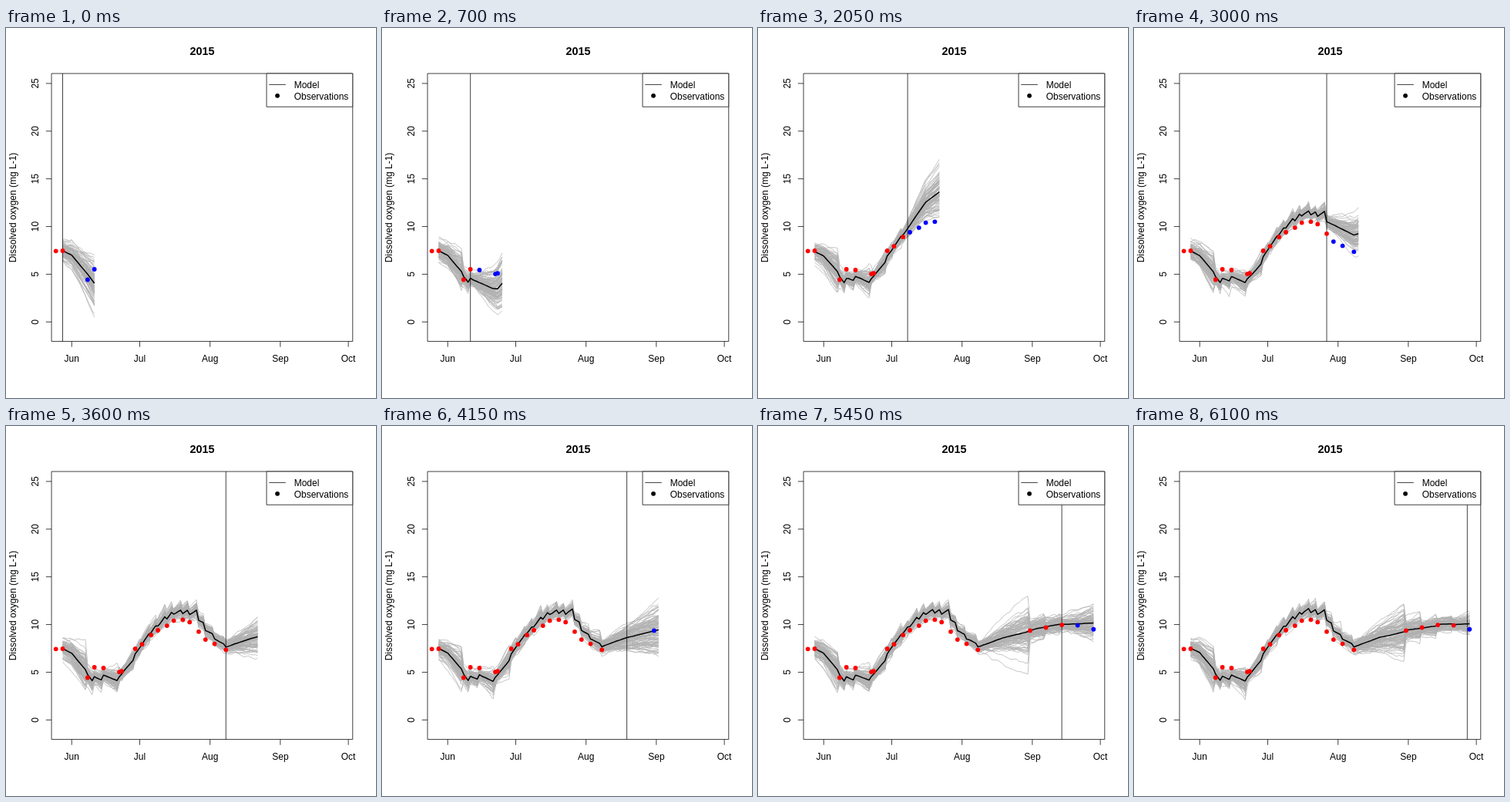
Animation, 480 px wide and 480 px high, one loop 6150 ms. Source, as an HTML page with a canvas:

```html
<!DOCTYPE html>
<html lang="en">
<head>
<meta charset="utf-8">
<title>Dissolved oxygen forecast</title>
<style>
html, body { margin: 0; width: 100%; height: 100%; overflow: hidden; background: #fff; }
canvas { display: block; }
</style>
</head>
<body>
<canvas id="stage" width="480" height="480"></canvas>
<script>
const ctx = document.getElementById('stage').getContext('2d');
const STEP = 50, DAYS = 123, HORIZON = 14, MEMBERS = 100, GAIN = 0.44;
const LEFT = 59.04, RIGHT = 449.76, TOP = 59.04, BOTTOM = 406.56;
const THIN = 0.75;
const FONT = '"Liberation Sans", Arial, sans-serif';

// Days count from 28 May; values are mg per litre.
// The axes show days 0..123 and values -1..25 with a 4% margin on each side.
const X = day => LEFT + (RIGHT - LEFT) * (day / DAYS + 0.04) / 1.08;
const Y = value => BOTTOM - (BOTTOM - TOP) * ((value + 1) / 26 + 0.04) / 1.08;

// Samples taken at a regular gap from a first day
const survey = (first, gap, values) =>
  values.map((value, i) => ({ day: Math.floor(first + i * gap), value }));

const observations = [
  survey(-3, 3, [7.43, 7.46]),
  survey(11, 3.5, [4.43, 5.52, 5.44]),
  survey(25, 1, [5.03, 5.1]),
  survey(32, 3.5, [7.46, 7.93, 8.9, 9.4, 9.88, 10.4, 10.5, 10.25, 9.25, 8.42, 7.98]),
  survey(72, 0, [7.35]),
  survey(95, 7, [9.36, 9.68, 9.96, 9.92, 9.5]),
].flat();

// Model drift per day, each rate holding until the given day
const rates = [[4, -0.12], [11, -0.28], [14, -0.32], [24, -0.1], [26, 0], [32, 0.28], [49, 0.34],
  [59, 0.17], [72, -0.12], [83, 0.086], [97, 0.06], [110, 0.04], [DAYS, 0.01]];
const drift = day => rates.find(([until]) => day <= until)[1];

function normalSource(seed) {
  const rnd = () => {
    seed = (seed + 0x6D2B79F5) | 0;
    let t = Math.imul(seed ^ (seed >>> 15), 1 | seed);
    t = (t + Math.imul(t ^ (t >>> 7), 61 | t)) ^ t;
    return ((t ^ (t >>> 14)) >>> 0) / 4294967296;
  };
  return () => Math.sqrt(-2 * Math.log(1 - rnd())) * Math.cos(2 * Math.PI * rnd());
}

const average = list => list.reduce((sum, v) => sum + v, 0) / list.length;

// Members drift apart along their own slopes; each observation pulls the mean and narrows the spread.
function simulate(today, end) {
  const normal = normalSource(1000 + today * 7919);
  const members = Array.from({ length: MEMBERS }, () =>
    ({ path: [7.45 + 0.5 * normal()], slope: normal() }));
  const mean = [average(members.map(m => m.path[0]))];
  for (let day = 1; day <= end; day++) {
    const growth = day < 56 ? 0.077 : 0.05;
    for (const { path, slope } of members) {
      path.push(path[day - 1] + drift(day) + growth * slope + 0.08 * normal());
    }
    const forecast = average(members.map(m => m.path[day]));
    const seen = day <= today && observations.find(o => o.day === day);
    const center = seen ? forecast + GAIN * (seen.value - forecast) : forecast;
    if (seen) {
      for (const m of members) {
        m.path[day] = center + 0.3 * (m.path[day] - forecast) + 0.28 * normal();
        m.slope = normal();
      }
    }
    mean.push(center);
  }
  return { members, mean };
}

function series(values, color, width) {
  ctx.strokeStyle = color;
  ctx.lineWidth = width;
  ctx.beginPath();
  values.forEach((v, day) => ctx.lineTo(X(day), Y(v)));
  ctx.stroke();
}

function line(x1, y1, x2, y2) {
  ctx.strokeStyle = '#000';
  ctx.lineWidth = THIN;
  ctx.beginPath();
  ctx.moveTo(x1, y1);
  ctx.lineTo(x2, y2);
  ctx.stroke();
}

function frame(x, y, right, bottom) {
  ctx.strokeStyle = '#000';
  ctx.lineWidth = THIN;
  ctx.strokeRect(x, y, right - x, bottom - y);
}

function dot(x, y, color) {
  ctx.fillStyle = color;
  ctx.beginPath();
  ctx.arc(x, y, 2.9, 0, 2 * Math.PI);
  ctx.fill();
}

function label(text, x, y, { align = 'center', turn = 0, font = '12px ' } = {}) {
  ctx.save();
  ctx.translate(x, y);
  ctx.rotate(turn);
  ctx.font = font + FONT;
  ctx.textAlign = align;
  ctx.fillStyle = '#000';
  ctx.fillText(text, 0, 0);
  ctx.restore();
}

function drawAxes() {
  const up = { turn: -Math.PI / 2 };
  frame(LEFT, TOP, RIGHT, BOTTOM);
  label('2015', 254.4, 35, { font: 'bold 14.4px ' });
  label('Dissolved oxygen (mg L-1)', 13, 233, up);
  ['Jun', 'Jul', 'Aug', 'Sep', 'Oct'].forEach((month, i) => {
    const x = X((Date.UTC(2015, 5 + i, 1) - Date.UTC(2015, 4, 28)) / 864e5);
    line(x, BOTTOM, x, BOTTOM + 7.2);
    label(month, x, 433);
  });
  for (let v = 0; v <= 25; v += 5) {
    line(LEFT - 7.2, Y(v), LEFT, Y(v));
    label(v, 42, Y(v), up);
  }
}

function drawLegend() {
  const x = 338.04, bottom = TOP + 43.2;
  ctx.fillStyle = '#fff';
  ctx.fillRect(x, TOP, RIGHT - x, bottom - TOP);
  frame(x, TOP, RIGHT, bottom);
  line(x + 3.24, TOP + 14.4, x + 24.84, TOP + 14.4);
  dot(x + 14.04, TOP + 28.8, '#000');
  label('Model', x + 35.6, 78, { align: 'left' });
  label('Observations', x + 35.6, 93, { align: 'left' });
}

function draw(today) {
  ctx.fillStyle = '#fff';
  ctx.fillRect(0, 0, 480, 480);
  ctx.lineJoin = 'round';
  const end = Math.min(today + HORIZON, DAYS);
  const { members, mean } = simulate(today, end);
  for (const m of members) series(m.path, '#b0b0b0', THIN);
  series(mean, '#000', 2 * THIN);
  line(X(today), TOP, X(today), BOTTOM);
  for (const { day, value } of observations) {
    if (day <= end) dot(X(day), Y(value), day <= today ? '#f00' : '#00f');
  }
  drawAxes();
  drawLegend();
}

const start = performance.now();
let shown = -1;
function tick() {
  const today = Math.floor((performance.now() - start) / STEP) % DAYS;
  if (today !== shown) draw(shown = today);
  requestAnimationFrame(tick);
}
tick();
</script>
</body>
</html>
```
